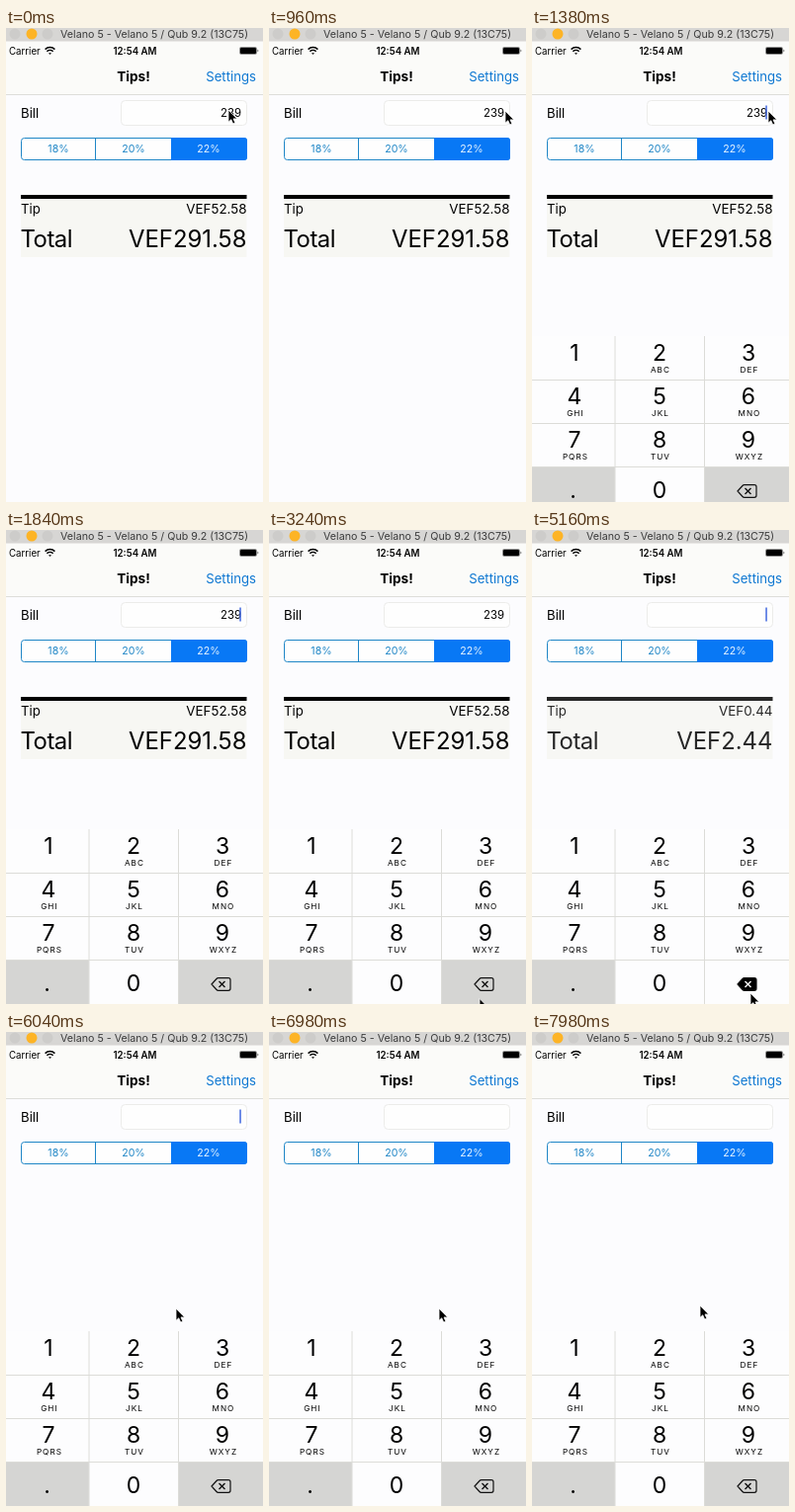
Recreate the animation shown at these times as an HTML page. Size 260 by 480 pixels, loop 8 s.

```html
<!DOCTYPE html>
<html lang="en">
<head>
<meta charset="utf-8">
<title>Tip calculator</title>
<style>
  html, body { margin: 0; width: 100%; height: 100%; overflow: hidden; background: #fcfcfe; }
  svg { display: block; width: 260px; height: 480px; font-family: Inter, Roboto, sans-serif; }
  .end { text-anchor: end; }
  .mid { text-anchor: middle; }
  .body { font-size: 13.2px; }
  .segments { font-size: 10.6px; fill: #1f86c6; }
  .total { font-size: 23.9px; }
  .digit { font-size: 23px; text-anchor: middle; }
  .letters { font-size: 8.2px; letter-spacing: 1px; text-anchor: middle; }
</style>
</head>
<body>
<svg viewBox="0 0 260 480">
  <rect width="260" height="480" fill="#fcfcfe"/>

  <!-- Window and status bars -->
  <rect y="13" width="260" height="55" fill="#fbfbf9"/>
  <path d="M0 67.5H260" stroke="#dededa"/>
  <rect width="260" height="13.5" fill="#d7d6d4"/>
  <circle cx="9" cy="6" r="5.5" fill="#cdccca"/>
  <circle cx="26" cy="6" r="5.5" fill="#fdb426"/>
  <circle cx="42" cy="6" r="5.5" fill="#cdccca"/>
  <text x="55" y="10" font-size="10.7" fill="#3c3c3c">Velano 5 - Velano 5 / Qub 9.2 (13C75)</text>
  <text x="3" y="26.5" font-size="9.7">Carrier</text>
  <g fill="none" stroke="#000" stroke-width="1.5">
    <path d="M39.6 21.6a7 7 0 0 1 9.8 0M41.4 23.8a4.4 4.4 0 0 1 6.2 0"/>
    <path d="M43 25.3h3l-1.5 1.7z" fill="#000" stroke="none"/>
  </g>
  <text class="mid" x="130.5" y="26.5" font-size="9.7" font-weight="600">12:54 AM</text>
  <rect x="236.5" y="19.5" width="17" height="7" rx="1.2" fill="none" stroke="#666" stroke-width=".7"/>
  <rect x="237" y="20" width="16" height="6" rx=".8"/>
  <path d="M254.6 21.5q1.5 1.5 0 3z"/>

  <!-- Form -->
  <text class="mid" x="129" y="54" font-size="13.6" font-weight="650">Tips!</text>
  <text class="body end" x="253" y="54" fill="#0f78d2">Settings</text>
  <text class="body" x="15" y="91">Bill</text>
  <rect x="116.5" y="73.5" width="127" height="25" rx="4" fill="#fefefe" stroke="#ececea"/>
  <text id="bill" class="end" x="238" y="90" font-size="11.4"></text>
  <rect id="caret" x="236.3" y="78.5" width="1.5" height="14" fill="#4269df"/>
  <g class="segments">
    <rect x="15.5" y="111.5" width="228" height="22" rx="3" fill="#fefefe" stroke="#1f86c6"/>
    <path d="M167 111H241q3 0 3 3V131q0 3-3 3H167z" fill="#0878f5"/>
    <path d="M90.5 111V134" stroke="#1f86c6"/>
    <text class="mid" x="53" y="126.3">18%</text>
    <text class="mid" x="129" y="126.3">20%</text>
    <text class="mid" x="205" y="126.3" fill="#e8f5ff">22%</text>
  </g>
  <g id="summary">
    <rect x="15" y="173" width="228.5" height="59" fill="#f7f7f3"/>
    <rect x="15" y="169" width="228.5" height="4"/>
    <text class="body" x="15" y="188">Tip</text>
    <text id="tip" class="end" x="243.5" y="188" font-size="13.4"></text>
    <text class="total" x="14.5" y="222" letter-spacing="-.5">Total</text>
    <text id="total" class="total end" x="243.5" y="222"></text>
  </g>

  <g id="keyboard">
    <rect y="303" width="260" height="180" fill="#fdfdfe"/>
    <rect y="436" width="84" height="50" fill="#d5d5d3"/>
    <rect id="deleteKey" x="174" y="436" width="86" height="50"/>
    <path d="M0 347.5H260M0 391.5H260M0 435.5H260M84 303V480M174.5 303V480" stroke="#dcdcd8" fill="none"/>
    <g id="keys"></g>
    <path id="deleteShape" d="M208 460l5-5.5q.7-.8 1.8-.8H225q2 0 2 2V464.300q0 2-2 2H214.800q-1.100 0-1.800-.8z" stroke="#111" stroke-width="1.2"/>
    <path id="deleteCross" d="M215.500 457l6 6m0-6l-6 6" stroke-width="1.4"/>
  </g>

  <path id="pointer" d="M0 0V12.200L2.800 9.700L4.700 14L6.900 13L5 8.900H8.800Z" stroke="#fff" stroke-width=".8"/>
</svg>
<script>
const $ = id => document.getElementById(id);
const LOOP = 8000;
const FOCUS = 1080;
const DELETES = [3700, 4370, 5035];
const HOLD = 150;

// Pointer stops: time, x, y
const POINTER = [
  [0, 225, 83], [550, 225, 83], [950, 239, 84], [1450, 239, 84],
  [1800, 226, 490], [3100, 212, 490], [3240, 213, 474.5], [3500, 221, 469],
  [5350, 221, 469], [5950, 172, 280], [7000, 172, 280], [7500, 170, 277], [LOOP, 170, 277]
];

const LETTERS = ['', 'ABC', 'DEF', 'GHI', 'JKL', 'MNO', 'PQRS', 'TUV', 'WXYZ'];
const COLUMNS = [43, 129, 219];
$('keys').innerHTML = LETTERS.map((letters, i) => {
  const x = COLUMNS[i % 3], y = 328 + 44 * Math.floor(i / 3);
  return `<text class="digit" x="${x}" y="${y}">${i + 1}</text>
    <text class="letters" x="${x + .9}" y="${y + 12}">${letters}</text>`;
}).join('') + `<text class="digit" x="129" y="467">0</text>
  <text class="digit" x="41.5" y="467">.</text>`;

const clamp = v => Math.max(0, Math.min(1, v));
const ease = p => p * p * (3 - 2 * p);
const money = v => 'VEF' + v.toFixed(2);

function pointerAt(t) {
  const i = POINTER.findIndex(stop => stop[0] > t);
  const [t0, x0, y0] = POINTER[i - 1], [t1, x1, y1] = POINTER[i];
  const p = ease((t - t0) / (t1 - t0));
  return [x0 + (x1 - x0) * p, y0 + (y1 - y0) * p];
}

function caretVisible(t, lastDelete) {
  if (t < FOCUS) return false;
  const start = lastDelete || 1350;
  return t < start || (t - start) % 1000 < 600;
}

function render(t) {
  const done = DELETES.filter(time => time <= t);
  const lastDelete = done[done.length - 1];
  const pressed = lastDelete !== undefined && t < lastDelete + HOLD;
  const text = '239'.slice(0, 3 - done.length);

  // The last amount stays on show while the summary fades out.
  const amount = Number(text || 2);
  $('bill').textContent = text;
  $('tip').textContent = money(amount * .22);
  $('total').textContent = money(amount * 1.22);
  $('summary').setAttribute('opacity', 1 - ease(clamp((t - DELETES[2]) / 500)));
  $('caret').setAttribute('opacity', caretVisible(t, lastDelete) ? 1 : 0);

  const k = Math.max(0, t - FOCUS) * .0158;
  const hidden = k > 12 ? 0 : (1 + k) * Math.exp(-k);
  $('keyboard').setAttribute('transform', `translate(0 ${Math.round(180 * hidden)})`);
  $('deleteKey').setAttribute('fill', pressed ? '#fdfdfe' : '#d5d5d3');
  $('deleteShape').setAttribute('fill', pressed ? '#000' : 'none');
  $('deleteCross').setAttribute('stroke', pressed ? '#fff' : '#111');
  $('pointer').setAttribute('transform', `translate(${pointerAt(t)})`);
}

function frame() {
  render(performance.now() % LOOP);
  requestAnimationFrame(frame);
}
frame();
</script>
</body>
</html>
```
